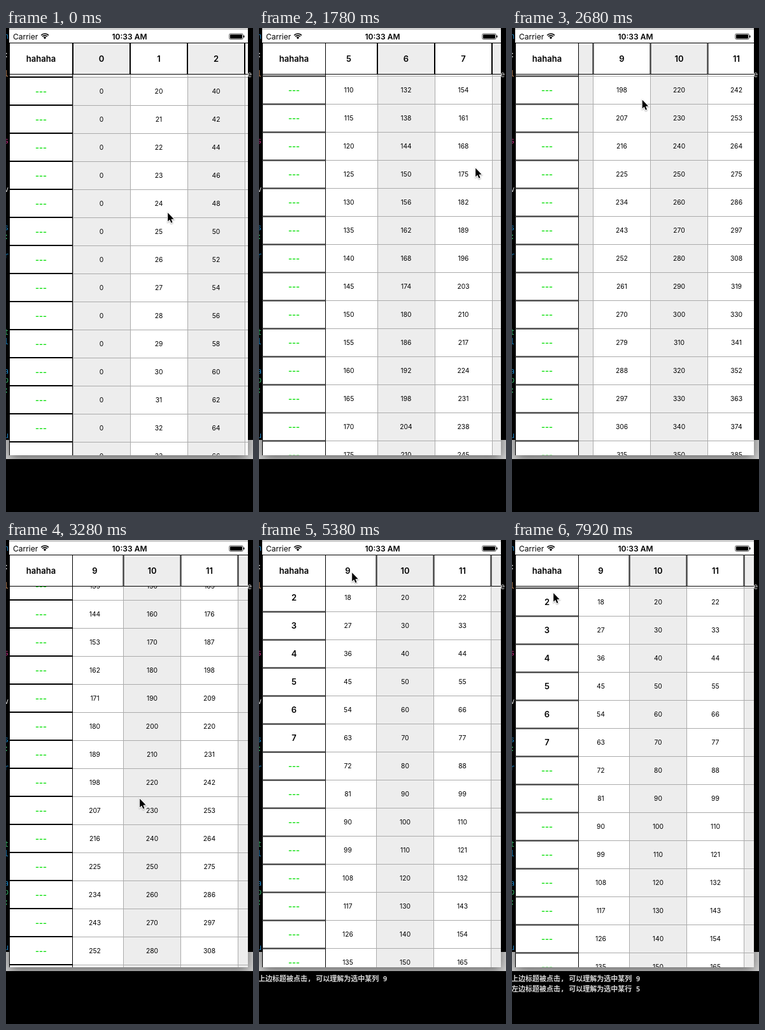
Write an HTML page with a canvas that moves like this. It is 388 px wide and 759 px high and loops after 8000 ms.

```html
<!DOCTYPE html>
<html lang="zh-CN">
<head>
<meta charset="utf-8">
<title>Scrolling table</title>
<style>
html, body { margin: 0; width: 100%; height: 100%; overflow: hidden; background: #000; }
canvas { display: block; width: 388px; height: 759px; }
</style>
</head>
<body>
<canvas id="stage"></canvas>
<script>
const W = 388, H = 759, LOOP = 8000;
const canvas = document.getElementById('stage');
const ctx = canvas.getContext('2d');
const dpr = window.devicePixelRatio || 1;
canvas.width = W * dpr;
canvas.height = H * dpr;

const PHONE = { x: 5, y: 3, r: 380, b: 670 };
const HEAD = { y: 23, b: 73 };
const LEFT = 105, COL = 90, ROW = 44;
const SANS = 'Inter, Roboto, sans-serif';
const MONO = '"DejaVu Sans Mono", "Noto Sans CJK SC", "Noto Sans CJK JP", monospace';
const BOLD = '600 13px ' + SANS;
const GRAY = '#ededed';

// Tracks: [tick, value...], each held until the next entry.
const pointer = [
  [0, 253, 288], [5, 276, 292], [6, 297, 297], [8, 262, 292], [9, 150, 275],
  [10, 84, 262], [11, 210, 240], [12, 339, 218], [13, 290, 205], [14, 190, 190],
  [15, 140, 170], [16, 150, 135], [17, 195, 113], [18, 203.5, 111], [20, 205, 150],
  [21, 207, 275], [22, 209, 404], [24, 208, 385], [25, 203, 330], [26, 190, 230],
  [27, 170, 130], [28, 155, 66], [29, 148, 57], [30, 145, 49.5], [43, 130, 85],
  [44, 95, 160], [45, 60, 225], [46, 49, 243], [52, 55, 150], [53, 64, 81.5]
];
const scrollX = [
  [0, 0], [8, 35], [9, 147], [10, 240], [11, 375], [12, 459], [13, 490], [14, 590],
  [15, 665], [16, 720], [17, 760], [18, 787.5], [19, 805], [20, 815], [21, 820.5]
];
const scrollY = [[0, 876], [1, 935], [2, 965.5], [20, 927], [21, 802]];

const logs = [
  [32, '上边标题被点击, 可以理解为选中某列 9', 692],
  [49, '左边标题被点击, 可以理解为选中某行 5', 708]
];

const BLUE = '#1a86c8', GREEN = '#35b56a', WHITE = '#d8d8d8';
const editor = [
  ['n', 17, BLUE], [':', 46, WHITE], ['l', 76, '#d09060'], ['s', 181, '#c02c80'],
  ['v', 257, WHITE], ['s', 317, BLUE], [':', 331, GREEN], ['r', 361, BLUE],
  ['t', 481, GREEN], ['l', 496, BLUE], ['a', 542, BLUE], ['p', 556, GREEN],
  [':', 572, GREEN], ['u', 643, BLUE]
];

const tickTime = n => 150 * n - 10 * ((n >= 1) + (n >= 6) + (n >= 39));

function tickAt(t) {
  let n = Math.floor(t / 150);
  while (tickTime(n + 1) <= t) n++;
  return n;
}

function held(track, n) {
  let key = track[0];
  for (const k of track) if (k[0] <= n) key = k;
  return key.slice(1);
}

function offsetY(n) {
  if (n < 22) return held(scrollY, n)[0];
  return Math.max(85.5, 74 + 609 * Math.pow(0.174, (n - 22) / 7));
}

function rect(x, y, w, h, color) {
  ctx.fillStyle = color;
  ctx.fillRect(x, y, w, h);
}

function text(str, x, y, font, color = '#000', align = 'center') {
  ctx.font = font;
  ctx.fillStyle = color;
  ctx.textAlign = align;
  ctx.fillText(str, x, y);
}

function clipped(x, y, r, b, draw) {
  ctx.save();
  ctx.beginPath();
  ctx.rect(x, y, r - x, b - y);
  ctx.clip();
  draw();
  ctx.restore();
}

// Title cell with a 1 px black frame inside its edges.
function titleCell(x, y, w, h, label, fill, color) {
  rect(x, y, w, h, '#000');
  rect(x + 1, y + 1, w - 2, h - 2, fill);
  text(label, x + w / 2, y + h / 2 + 4.7, BOLD, color);
}

function backdrop() {
  rect(0, 0, W, H, '#000');
  for (const [ch, y, color] of editor) text(ch, -3, y, '12px ' + MONO, color, 'left');
  text('e', 379, 77, '12px ' + MONO, WHITE, 'left');
  rect(PHONE.x, 0, PHONE.r - PHONE.x, 3, '#cfcfcf');
  clipped(0, 646, W, 676, () => {
    rect(0, 646, W, 30, '#d6d6d6');
    ctx.shadowColor = 'rgba(0,0,0,.55)';
    ctx.shadowBlur = 18 * dpr;
    ctx.shadowOffsetY = 5 * dpr;
    rect(PHONE.x, PHONE.y, PHONE.r - PHONE.x, PHONE.b - PHONE.y, '#fff');
  });
  rect(PHONE.x, PHONE.y, PHONE.r - PHONE.x, PHONE.b - PHONE.y, '#fff');
}

function statusBar() {
  text('Carrier', 11, 17.5, '12px ' + SANS, '#000', 'left');
  text('10:33 AM', 194, 17.5, '600 12px ' + SANS);

  ctx.strokeStyle = '#000';
  ctx.lineWidth = 1.7;
  for (const r of [8, 5.2]) {
    ctx.beginPath();
    ctx.arc(61, 17, r, -Math.PI * 0.76, -Math.PI * 0.24);
    ctx.stroke();
  }
  ctx.fillStyle = '#000';
  ctx.beginPath();
  ctx.moveTo(61, 17.5);
  ctx.arc(61, 17, 3, -Math.PI * 0.76, -Math.PI * 0.24);
  ctx.fill();

  ctx.lineWidth = 0.7;
  ctx.beginPath();
  ctx.roundRect(350.8, 9, 21.5, 8.6, 1.8);
  ctx.stroke();
  ctx.fillStyle = '#000';
  ctx.beginPath();
  ctx.roundRect(352, 10.2, 19, 6.2, 0.9);
  ctx.roundRect(373, 11.6, 1.5, 3.4, 0.7);
  ctx.fill();
}

function table(sx, sy) {
  const firstCol = Math.floor(sx / COL), firstRow = Math.floor(sy / ROW);
  const colX = c => LEFT + c * COL - sx;
  const rowY = r => HEAD.b + r * ROW - sy;
  const shade = c => c % 2 ? '#fff' : GRAY;

  clipped(LEFT, HEAD.b, PHONE.r, PHONE.b, () => {
    for (let c = firstCol; colX(c) < PHONE.r; c++) {
      const x = colX(c);
      rect(x, HEAD.b, COL, PHONE.b - HEAD.b, shade(c));
      for (let r = firstRow; rowY(r) < PHONE.b; r++) {
        text(c * r, x + COL / 2, rowY(r) + ROW / 2 + 3.7, '10.3px ' + SANS);
      }
    }
    for (let c = firstCol; colX(c) < PHONE.r; c++) {
      rect(Math.floor(colX(c)), HEAD.b, 1, PHONE.b - HEAD.b, '#ababab');
    }
    for (let r = firstRow; rowY(r) < PHONE.b; r++) {
      rect(LEFT, Math.floor(rowY(r)), PHONE.r - LEFT, 1, '#ababab');
    }
  });

  clipped(PHONE.x, HEAD.b, LEFT, PHONE.b, () => {
    for (let r = firstRow; rowY(r) < PHONE.b; r++) {
      const named = r < 8;
      titleCell(PHONE.x, rowY(r), LEFT - PHONE.x, ROW,
        named ? String(r) : '---', '#fff', named ? '#000' : '#0be00b');
    }
  });

  clipped(LEFT, HEAD.y, PHONE.r, HEAD.b, () => {
    for (let c = firstCol; colX(c) < PHONE.r; c++) {
      titleCell(colX(c), HEAD.y, COL, HEAD.b - HEAD.y, String(c), shade(c));
    }
  });
  titleCell(PHONE.x, HEAD.y, LEFT - PHONE.x, HEAD.b - HEAD.y, 'hahaha', '#fff');
}

function arrow(x, y) {
  ctx.save();
  ctx.translate(x + 1.2, y + 1.8);
  ctx.beginPath();
  ctx.moveTo(0, 0);
  ctx.lineTo(0, 13.5);
  ctx.lineTo(3, 10.8);
  ctx.lineTo(5.2, 15.8);
  ctx.lineTo(7.3, 14.9);
  ctx.lineTo(5.2, 10);
  ctx.lineTo(9.4, 9.7);
  ctx.closePath();
  ctx.lineWidth = 2;
  ctx.strokeStyle = '#fff';
  ctx.shadowColor = 'rgba(0,0,0,.35)';
  ctx.shadowBlur = 2 * dpr;
  ctx.shadowOffsetY = dpr;
  ctx.stroke();
  ctx.shadowColor = 'transparent';
  ctx.fillStyle = '#000';
  ctx.fill();
  ctx.restore();
}

function draw(t) {
  const n = tickAt(t);
  ctx.setTransform(dpr, 0, 0, dpr, 0, 0);
  backdrop();
  statusBar();
  table(held(scrollX, n)[0], offsetY(n));
  for (const [from, line, y] of logs) {
    if (n >= from) text(line, -1, y, 'bold 11px ' + MONO, WHITE, 'left');
  }
  arrow(...held(pointer, n));
}

const start = performance.now();
function loop() {
  draw((performance.now() - start) % LOOP);
  requestAnimationFrame(loop);
}
loop();
</script>
</body>
</html>
```
